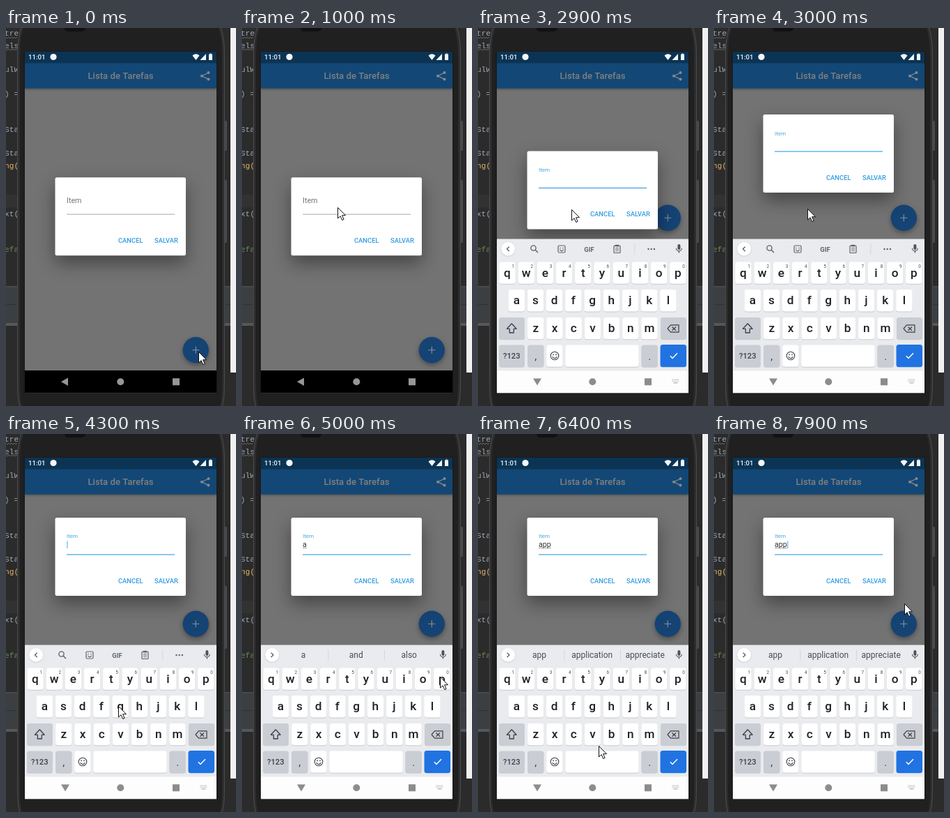
These frames come from a looping animation (330 px wide and 542 px high, 8 s). An HTML page with a canvas:

```html
<!DOCTYPE html>
<html lang="pt">
<head>
<meta charset="utf-8">
<title>Lista de Tarefas</title>
<style>
html, body { margin: 0; width: 100%; height: 100%; overflow: hidden; background: #2b2b2b; }
canvas { display: block; width: 100vw; height: 100vh; }
</style>
</head>
<body>
<canvas id="stage"></canvas>
<script>
const W = 330, H = 542, LOOP = 8000;
const canvas = document.getElementById('stage');
const ctx = canvas.getContext('2d');
const ROBOTO = 'Roboto, sans-serif';
const MONO = '"Liberation Mono", monospace';
const BLUE = '#2f9be0';

const SHOW_KEYBOARD = 2850, FOCUS = 1650;

// time, x, y of the pointer tip
const POINTER = [
  [0, 277, 465], [500, 138, 258], [1650, 138, 258], [1700, 136, 261], [2800, 136, 261],
  [3000, 134.5, 260], [3200, 136, 264], [3700, 160, 418], [4000, 163, 409], [4300, 162, 391],
  [4390, 56, 392], [4480, 56, 392], [4600, 264, 356], [4800, 284, 350], [5000, 285, 349],
  [5700, 285, 349], [6400, 174, 448], [6800, 180, 471], [7300, 238, 466], [7900, 274, 244]
];

// time the key goes down, key, text after it
const PRESSES = [[4390, 'a', 'a'], [5200, 'p', 'ap'], [5580, 'p', 'app']];
const HOLD = 80;

const ROWS = [
  { keys: 'qwertyuiop', x: 42, y: 351 },
  { keys: 'asdfghjkl', x: 55.3, y: 390.6 },
  { keys: 'zxcvbnm', x: 82.8, y: 430.5 }
];
const PITCH = 27.2;

const clamp = v => Math.max(0, Math.min(1, v));
const mix = (a, b, p) => a + (b - a) * p;
const smooth = p => p * p * (3 - 2 * p);
const grayOf = v => `rgb(${v},${v},${v})`;

function rect(x, y, w, h, color) {
  ctx.fillStyle = color;
  ctx.fillRect(x, y, w, h);
}

function round(x, y, w, h, r, color) {
  ctx.fillStyle = color;
  ctx.beginPath();
  ctx.roundRect(x, y, w, h, r);
  ctx.fill();
}

function disc(x, y, r, color) {
  ctx.fillStyle = color;
  ctx.beginPath();
  ctx.arc(x, y, r, 0, 7);
  ctx.fill();
}

function ring(x, y, r, color, width = 1) {
  ctx.strokeStyle = color;
  ctx.lineWidth = width;
  ctx.beginPath();
  ctx.arc(x, y, r, 0, 7);
  ctx.stroke();
}

function trace(points) {
  ctx.beginPath();
  for (let i = 0; i < points.length; i += 2) ctx.lineTo(points[i], points[i + 1]);
}

function poly(color, ...points) {
  trace(points);
  ctx.fillStyle = color;
  ctx.fill();
}

function line(color, width, ...points) {
  trace(points);
  ctx.strokeStyle = color;
  ctx.lineWidth = width;
  ctx.stroke();
}

function text(str, x, y, size, color, { align = 'left', weight = 400, family = ROBOTO } = {}) {
  ctx.font = `${weight} ${size}px ${family}`;
  ctx.textAlign = align;
  ctx.fillStyle = color;
  ctx.fillText(str, x, y);
}

function withShadow(color, blur, dy, draw) {
  const k = canvas.width / W;
  ctx.save();
  ctx.shadowColor = color;
  ctx.shadowBlur = blur * k;
  ctx.shadowOffsetY = dy * k;
  draw();
  ctx.restore();
}

function wave(y) {
  const pts = [];
  for (let x = 0; x <= 17; x += 2) pts.push(x, y + (x % 4 ? 1 : -1));
  line('#77776f', 0.8, ...pts);
}

function drawEditor() {
  rect(0, 0, W, H, '#2b2b2b');
  rect(0, 239, 18, 18, '#323232');
  const code = [
    ['tre', 11], ['els', 29], ['ulW', 63], [') =', 98], ['Sta', 149],
    ['Sta', 183], ['ng(', 201, '#e5b567'], ['xt(', 270], ['efa', 321, '#6a8759']
  ];
  for (const [str, y, color = '#9da9b6'] of code) text(str, -2, y, 11.2, color, { family: MONO });
  wave(14);
  wave(31);
  rect(0, 370, W, 54, '#3c3f41');
  rect(0, 370, W, 1.5, '#4b4e50');
  rect(0, 396, W, 1, '#2f3133');
  rect(0, 423, W, 4, '#55585a');
  rect(0, 427, W, 115, '#2b2b2b');
  rect(322, 0, 8, 494, '#f1f1f1');
  rect(322, 494, 8, 48, '#2b2b2b');
}

function drawPhone() {
  round(312, 133, 5, 43, 1.5, '#4a4a4c');
  round(312, 218, 5, 90, 1.5, '#4a4a4c');
  const shell = (inset, color) => {
    ctx.beginPath();
    ctx.moveTo(21 + inset, 0);
    ctx.quadraticCurveTo(16 + inset, 16, 16 + inset, 36);
    ctx.lineTo(16 + inset, 510);
    ctx.quadraticCurveTo(16 + inset, 532, 19 + inset, H);
    ctx.lineTo(311 - inset, H);
    ctx.quadraticCurveTo(314 - inset, 532, 314 - inset, 510);
    ctx.lineTo(314 - inset, 36);
    ctx.quadraticCurveTo(314 - inset, 16, 309 - inset, 0);
    ctx.fillStyle = color;
    ctx.fill();
  };
  shell(0, '#48484a');
  shell(1.3, '#2c2c2d');
  shell(4, '#202021');
  round(84, -6, 30, 11, 5, '#111');
  rect(25.5, 33, 278, 492, '#1a1a1b');
}

function drawStatusBar() {
  rect(27, 34, 275, 16.5, '#0b3454');
  text('11:01', 32, 45.3, 9.6, '#f4f6f8', { weight: 500 });
  disc(68, 41.5, 4.6, '#f4f6f8');
  ctx.beginPath();
  ctx.moveTo(272.5, 46);
  ctx.lineTo(267.5, 39.5);
  ctx.quadraticCurveTo(272.5, 35, 277.5, 39.5);
  ctx.fillStyle = '#f4f6f8';
  ctx.fill();
  poly('#f4f6f8', 278.5, 46, 287, 46, 287, 37);
  rect(291, 37.5, 5, 8.5, '#f4f6f8');
  rect(292.3, 36.5, 2.4, 1.2, '#f4f6f8');
}

function drawAppBar() {
  withShadow('rgba(0,0,0,.3)', 3, 1, () => rect(27, 50, 275, 36.5, '#134775'));
  text('Lista de Tarefas', 164.5, 73.3, 13.2, '#808080', { align: 'center', weight: 500 });
  const gray = '#858a8e';
  line(gray, 1.2, 290.5, 64, 281, 68.8, 290.5, 73.6);
  disc(290.5, 64, 2, gray);
  disc(281, 68.8, 2, gray);
  disc(290.5, 73.6, 2, gray);
}

function drawFab(y) {
  withShadow('rgba(0,0,0,.35)', 7, 3, () => disc(272.3, y, 18.7, '#154374'));
  line('#8b9299', 1.1, 267.3, y, 277.3, y);
  line('#8b9299', 1.1, 272.3, y - 5, 272.3, y + 5);
}

function drawNav(t) {
  const open = t >= SHOW_KEYBOARD;
  const gray = open ? '#8c8c8c' : grayOf(mix(150, 92, clamp((t - 2200) / 400)));
  rect(27, 491, 275, 32.5, open ? '#fdfdfd' : '#000');
  if (open) poly(gray, 79, 502.5, 91, 502.5, 85, 512.5);
  else poly(gray, 89, 501.5, 89, 513, 79, 507.2);
  disc(164.3, 507.3, 5, gray);
  rect(239, 502.3, 10, 10, gray);
  if (t < 1780) return;
  const dots = open ? '#b4b4b4' : '#444';
  for (let r = 0; r < 2; r++)
    for (let c = 0; c < 5; c++) rect(278.5 + c * 2.1, 503.5 + r * 2.3, 1.2, 1.3, dots);
  rect(280.5, 508.2, 6, 1.3, dots);
}

function typedText(t) {
  let str = '';
  for (const [at, , after] of PRESSES) if (t >= at + HOLD) str = after;
  return str;
}

function caretVisible(t) {
  if (t < 1760) return false;
  if (t < 2290) return t < 1980;
  let start = 2290;
  for (const [at] of PRESSES) if (t >= at + HOLD) start = at + HOLD;
  return (t - start) % 1000 < 500;
}

function drawDialog(t) {
  const p = clamp((t - 2860) / 177);
  const y = mix(214.3, 120, 1 - (1 - p) ** 2);
  withShadow('rgba(0,0,0,.4)', 26, 11, () => round(70.5, y, 187.5, 112, 2.5, '#fff'));

  const f = smooth(clamp((t - FOCUS) / 130));
  text('Item', 87, y + mix(36.8, 29.4, f), mix(10.7, 8, f), f > 0.5 ? '#4aa6e2' : '#757575');
  rect(87, y + 52.4, 155, mix(0.8, 1.1, f), f > 0.5 ? BLUE : '#949494');

  const str = typedText(t);
  const base = y + 42;
  text(str, 87, base, 10.7, '#333');
  const width = ctx.measureText(str).width;
  if (str) rect(87, base + 1.4, width, 0.6, '#666');
  if (caretVisible(t)) rect(87.4 + width, base - 8.6, 1.1, 10.6, '#5aaee4');

  const button = { weight: 500 };
  text('CANCEL', 161, y + 93.8, 9.4, BLUE, button);
  text('SALVAR', 213, y + 93.8, 9.4, BLUE, button);
}

function key(x, y, w, color = '#fff') {
  round(x, y - 14.7, w, 31.5, 3.5, '#c8cace');
  round(x, y - 15.5, w, 31.3, 3.5, color);
}

function drawTools() {
  const c = '#5f6368';
  ring(79.5, 315.5, 3.6, c, 1.4);
  line(c, 1.5, 82.2, 318.2, 86, 322);
  ctx.strokeStyle = c;
  ctx.lineWidth = 1.2;
  ctx.beginPath();
  ctx.roundRect(115, 312, 10, 10, 1.5);
  ctx.roundRect(195, 312.2, 9, 10.3, 1);
  ctx.stroke();
  disc(118, 315.5, 0.8, c);
  disc(122, 315.5, 0.8, c);
  ctx.beginPath();
  ctx.arc(120, 317, 2.6, 0.2, 2.9);
  ctx.stroke();
  text('GIF', 159.5, 320.5, 9.4, c, { align: 'center', weight: 700 });
  rect(197, 310.8, 5, 2.6, c);
  for (let i = 0; i < 3; i++) line(c, 0.8, 197, 315.5 + i * 2.1, 202, 315.5 + i * 2.1);
  rect(224.5, 309, 0.8, 16, '#cfd1d5');
  for (let i = 0; i < 3; i++) disc(244.5 + i * 4.2, 317, 1.2, c);
}

function drawStrip(t) {
  const words = t >= 5700 ? ['app', 'application', 'appreciate']
    : t >= 4490 ? ['a', 'and', 'also'] : null;
  const d = words ? 1 : -1;
  withShadow('rgba(0,0,0,.2)', 2, 0.5, () => disc(43.2, 316.8, 10, '#fff'));
  line('#4a4d51', 1.2, 43.2 - d * 1.5, 313.6, 43.2 + d * 1.7, 316.8, 43.2 - d * 1.5, 320);
  if (words) {
    words.forEach((w, i) => text(w, [88, 163.7, 239.7][i], 321.2, 12, '#4a4d51', { align: 'center' }));
    rect(123.5, 309, 0.8, 16, '#cfd1d5');
    rect(204, 309, 0.8, 16, '#cfd1d5');
  } else {
    drawTools();
  }
  round(286.4, 310, 4, 8, 2, '#505357');
  ctx.strokeStyle = '#505357';
  ctx.lineWidth = 1.1;
  ctx.beginPath();
  ctx.arc(288.4, 315.7, 4, 0, Math.PI);
  ctx.stroke();
  line('#505357', 1.2, 288.4, 319.7, 288.4, 322.5);
}

function drawPopup(t) {
  for (const [at, letter] of PRESSES) {
    if (t < at || t >= at + HOLD + 30) continue;
    const row = ROWS.find(r => r.keys.includes(letter));
    const x = row.x + row.keys.indexOf(letter) * PITCH;
    withShadow('rgba(0,0,0,.3)', 3, 1, () => round(x - 14, row.y - 53, 28, 37, 4, '#fff'));
    text(letter, x, row.y - 28, 20, '#202124', { align: 'center' });
  }
}

function drawKeyboard(t) {
  const dark = '#3c4043', gray = '#cbcdd4';
  rect(27, 302.5, 275, 189, '#e9ebee');
  drawStrip(t);
  ROWS.forEach((row, r) => [...row.keys].forEach((ch, i) => {
    const x = row.x + i * PITCH;
    key(x - 11.7, row.y, 23.4);
    text(ch, x, row.y + 5.6, 17.2, '#202124', { align: 'center', weight: 500 });
    if (!r) text((i + 1) % 10, x + 8.2, 343.5, 6.4, '#4a4d51', { align: 'center' });
  }));

  key(30, 430.5, 37, gray);
  ctx.lineJoin = 'round';
  line(dark, 1.3, 48.3, 423.8, 41.5, 431.3, 45.3, 431.3, 45.3, 437, 51.3, 437, 51.3, 431.3, 55.1, 431.3, 48.3, 423.8);
  key(262, 430.5, 37, gray);
  line(dark, 1.2, 272, 431, 276.5, 425.8, 288, 425.8, 288, 436.2, 276.5, 436.2, 272, 431);
  line(dark, 1.2, 278.5, 428.5, 284, 433.8);
  line(dark, 1.2, 284, 428.5, 278.5, 433.8);

  const y = 470;
  key(30, y, 37, gray);
  text('?123', 48.3, y + 4, 11.2, dark, { align: 'center', weight: 500 });
  key(71, y, 23.4, gray);
  text(',', 82.7, y + 6, 15, dark, { align: 'center' });
  key(98.2, y, 23.4);
  ring(110, y, 5.8, dark, 1.1);
  disc(108, y - 1.7, 0.9, dark);
  disc(112, y - 1.7, 0.9, dark);
  ctx.beginPath();
  ctx.arc(110, y + 0.5, 3.1, 0.15, 3);
  ctx.stroke();
  key(125.2, y, 105.5);
  key(234.5, y, 23.4, gray);
  text('.', 246.2, y + 6, 15, dark, { align: 'center' });
  round(261.5, y - 16, 37.5, 32.3, 3.5, '#2173e2');
  line('#fff', 1.5, 275.8, y + 0.3, 279, y + 3.5, 286, y - 3.7);
  drawPopup(t);
}

function pointerAt(t) {
  const i = POINTER.findIndex(k => k[0] > t);
  if (i < 0) return POINTER[POINTER.length - 1].slice(1);
  const [t0, x0, y0] = POINTER[i - 1], [t1, x1, y1] = POINTER[i];
  const p = smooth((t - t0) / (t1 - t0));
  return [mix(x0, x1, p), mix(y0, y1, p)];
}

function drawPointer(t) {
  const [x, y] = pointerAt(t);
  ctx.save();
  ctx.translate(Math.round(x) - 0.5, Math.round(y) - 0.5);
  ctx.lineJoin = 'miter';
  trace([0, 0, 0, 15.5, 3.6, 12.2, 6.2, 18, 8.6, 17, 6.1, 11.2, 11, 11.2]);
  ctx.closePath();
  ctx.fillStyle = '#fff';
  ctx.fill();
  ctx.strokeStyle = '#111';
  ctx.lineWidth = 1;
  ctx.stroke();
  ctx.restore();
}

function draw(t) {
  const open = t >= SHOW_KEYBOARD;
  drawEditor();
  drawPhone();
  ctx.save();
  ctx.beginPath();
  ctx.rect(27, 34, 275, 489.5);
  ctx.clip();
  rect(27, 34, 275, 490, '#737373');
  drawAppBar();
  drawStatusBar();
  drawFab(open ? 272.3 : 461.8);
  drawDialog(t);
  drawNav(t);
  if (open) drawKeyboard(t);
  ctx.restore();
  drawPointer(t);
}

function resize() {
  const dpr = window.devicePixelRatio || 1;
  canvas.width = Math.round(innerWidth * dpr) || W;
  canvas.height = Math.round(innerHeight * dpr) || H;
}

let start = null;
function tick(now) {
  if (start === null) start = now;
  ctx.setTransform(canvas.width / W, 0, 0, canvas.height / H, 0, 0);
  draw((now - start) % LOOP);
  requestAnimationFrame(tick);
}

addEventListener('resize', resize);
resize();
requestAnimationFrame(tick);
</script>
</body>
</html>
```
